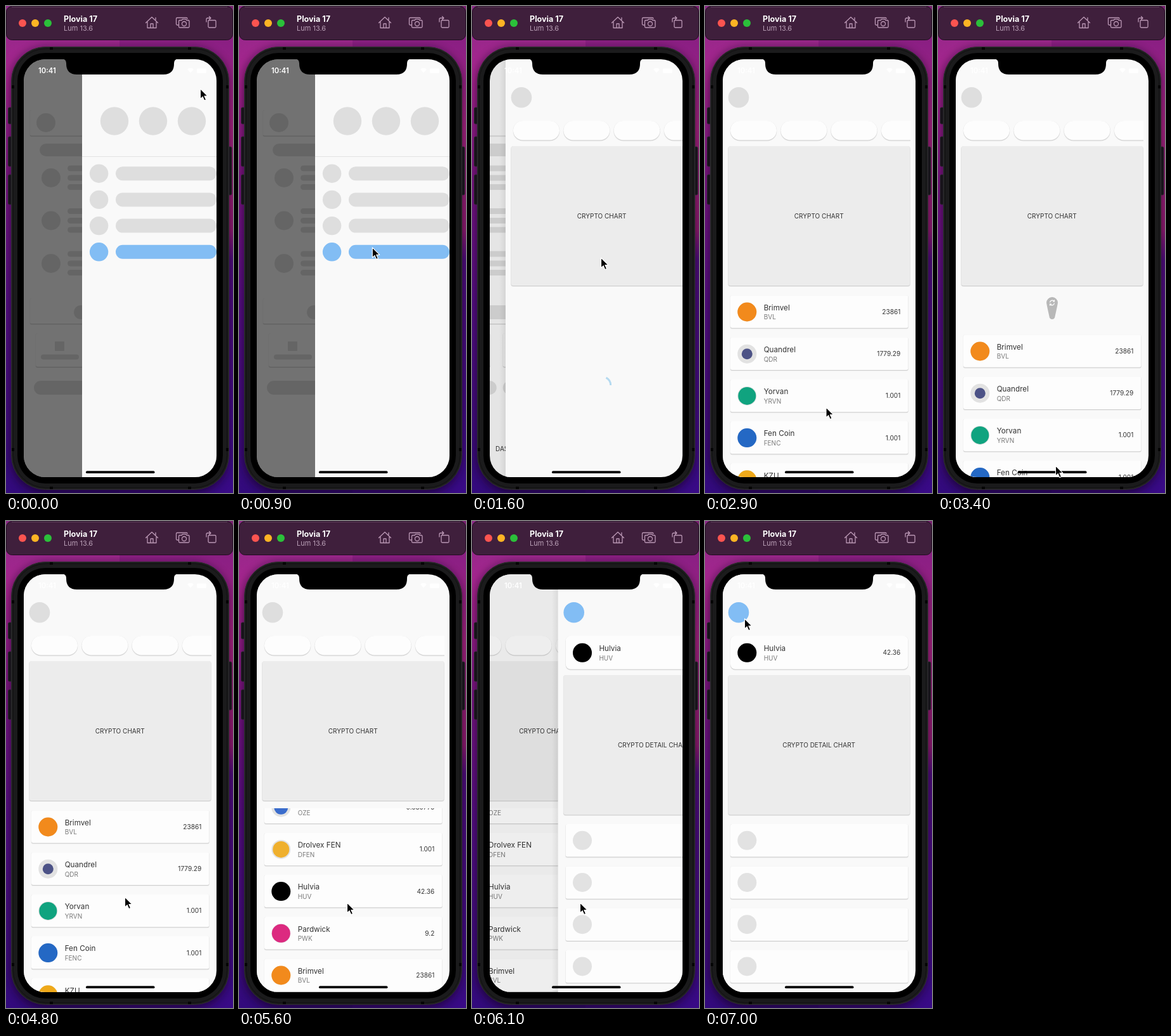
Write an HTML page that moves like this. It is 358x768 px and loops after 7100 ms.

```html
<!DOCTYPE html>
<html lang="en">
<head>
<meta charset="utf-8">
<title>Phone app walkthrough</title>
<style>
html, body { margin: 0; width: 100%; height: 100%; overflow: hidden; background: #3a0c70; }
svg { display: block; width: 358px; height: 768px; font-family: Inter, Roboto, sans-serif; }
</style>
</head>
<body>
<svg id="stage" viewBox="0 0 358 768" xmlns="http://www.w3.org/2000/svg">
  <defs>
    <linearGradient id="wallL" x2="0" y2="1">
      <stop offset="0" stop-color="#8d2a88"/><stop offset=".15" stop-color="#a9248f"/>
      <stop offset=".35" stop-color="#7c1583"/><stop offset=".6" stop-color="#560e86"/>
      <stop offset="1" stop-color="#320a7c"/>
    </linearGradient>
    <linearGradient id="wallR" x2="0" y2="1">
      <stop offset="0" stop-color="#7a2070"/><stop offset=".08" stop-color="#8c1f84"/>
      <stop offset=".25" stop-color="#a0237c"/><stop offset=".46" stop-color="#8a1a6c"/>
      <stop offset=".52" stop-color="#4a0c78"/><stop offset="1" stop-color="#380a86"/>
    </linearGradient>
    <linearGradient id="edge">
      <stop offset="0" stop-color="#000" stop-opacity="0"/>
      <stop offset="1" stop-color="#000" stop-opacity=".07"/>
    </linearGradient>
    <filter id="soft" x="-20%" y="-20%" width="140%" height="140%"><feGaussianBlur stdDeviation="7"/></filter>
    <clipPath id="screenClip"><rect x="28" y="84" width="304" height="659" rx="34"/></clipPath>
    <clipPath id="listClip"><rect x="28" y="453" width="304" height="290"/></clipPath>
    <clipPath id="chipClip"><rect x="36" y="176" width="288" height="42"/></clipPath>
  </defs>

  <rect width="358" height="768" fill="url(#wallL)"/>
  <rect x="179" width="179" height="768" fill="url(#wallR)"/>
  <rect x="6" y="66" width="346" height="704" rx="58" fill="#12001c" opacity=".6" filter="url(#soft)"/>

  <g id="bar">
    <rect x=".5" y=".5" width="357" height="53" rx="9" fill="#3f1f3c" stroke="#210d22"/>
    <path d="M9 1.5H349" stroke="#755270" opacity=".7"/>
    <circle cx="26" cy="27" r="6" fill="#fb5450"/>
    <circle cx="46" cy="27" r="6" fill="#fcb424"/>
    <circle cx="66" cy="27" r="6" fill="#2bc03a"/>
    <text x="91" y="25" font-size="12.6" font-weight="700" fill="#fff">Plovia 17</text>
    <text x="91" y="39" font-size="11" fill="#b99fb6">Lum 13.6</text>
    <g fill="none" stroke="#bb98b5" stroke-width="1.3" stroke-linejoin="round" stroke-linecap="round">
      <path d="M220.500 26.500L230 17.500L239.500 26.500M223 25V34.500H237V25M228 34V28H232V34M236 22V18.500"/>
      <path d="M271.500 30H270A1.500 1.500 0 0 1 268.500 28.500V20A1.500 1.500 0 0 1 270 18.500H284.500A1.500 1.500 0 0 1 286 20"/>
      <path d="M274 22.500H277L278.500 20.800H283.500L285 22.500H287.500A1.500 1.500 0 0 1 289 24V32.500A1.500 1.500 0 0 1 287.500 34H274A1.500 1.500 0 0 1 272.500 32.500V24A1.500 1.500 0 0 1 274 22.500Z"/>
      <circle cx="281" cy="28" r="3.500"/>
      <rect x="319" y="22.500" width="12" height="11.500" rx="1.500"/>
      <path d="M316 25V21A2 2 0 0 1 318 19H323M320.500 16.500L323 19L320.500 21.500"/>
    </g>
  </g>

  <g fill="#17131a" stroke="#2c2830" stroke-width=".8">
    <rect x="3.500" y="160" width="7" height="26" rx="2"/>
    <rect x="3.500" y="206" width="7" height="47" rx="2"/>
    <rect x="3.500" y="266" width="7" height="47" rx="2"/>
    <rect x="349" y="222" width="7" height="76" rx="2"/>
  </g>
  <rect x="8.500" y="64.500" width="343" height="698" rx="54" fill="#1b1b1c" stroke="#303032"/>
  <rect x="11.500" y="67.500" width="337" height="692" rx="51" fill="none" stroke="#111" stroke-width="1"/>
  <path d="M69 67H74M287 67H292M69 760H74M287 760H292M11 125V130M349 125V130M11 697V702M349 697V702" stroke="#050505" stroke-width="4"/>
  <rect x="18" y="74" width="324" height="679" rx="44" fill="#000"/>

  <g clip-path="url(#screenClip)">
    <g id="feed"></g>
    <rect id="scrim" x="28" y="84" width="304" height="659"/>
    <g id="drawer"></g>
    <g id="market"></g>
    <rect id="shade" x="28" y="84" width="304" height="659"/>
    <g id="detail"></g>
    <text x="51" y="106" font-size="11.300" font-weight="600" fill="#fff">10:41</text>
    <path d="M286 100Q291 95.500 296 100L291 105.500Z" fill="#fff"/>
    <rect x="301" y="98.500" width="15" height="7.500" rx="2.200" fill="#fff"/>
    <rect x="126" y="733.300" width="108.500" height="3.800" rx="1.900" fill="#000"/>
  </g>
  <path d="M88 83Q95 84 95 90V91Q95 108 112 108H248Q265 108 265 91V90Q265 84 272 83Z" fill="#000"/>
  <path id="cursor" d="M0 0V16L3.700 12.600L6.300 18.600L9 17.400L6.400 11.600H11.500Z" fill="#000" stroke="#fff" stroke-width="1.100" stroke-linejoin="round"/>
</svg>
<script>
const LOOP = 7100, STEP = 100, WIDTH = 304, PITCH = 66.2;
const PAPER = '#f9f9f9', GREY = '#dedede', BLUE = '#82bdf4';
const $ = id => document.getElementById(id);

// name, ticker, price, mark colour, mark radius
const coins = [
  ['Brimvel', 'BVL', '23861', '#f28a1c', 15],
  ['Quandrel', 'QDR', '1779.29', '#4c5286', 8.5],
  ['Yorvan', 'YRVN', '1.001', '#10a37f', 14],
  ['Fen Coin', 'FENC', '1.001', '#2468c4', 15],
  ['KZU', 'KZU', '324.5', '#efa91a', 15],
  ['VRP', 'VRP', '0.3777', '#2b2f36', 12],
  ['Orzeno', 'OZE', '0.539775', '#3a6ccc', 11],
  ['Drolvex FEN', 'DFEN', '1.001', '#efb02e', 13],
  ['Hulvia', 'HUV', '42.36', '#000', 15],
  ['Pardwick', 'PWK', '9.2', '#dc2a80', 14.5]
];

const rect = (x, y, w, h, r, fill, extra = '') =>
  `<rect x="${x}" y="${y}" width="${w}" height="${h}" rx="${r}" fill="${fill}" ${extra}/>`;
const disc = (x, y, r, fill) => `<circle cx="${x}" cy="${y}" r="${r}" fill="${fill}"/>`;
const text = (x, y, size, fill, str, anchor = 'start') =>
  `<text x="${x}" y="${y}" font-size="${size}" fill="${fill}" text-anchor="${anchor}">${str}</text>`;
const card = (x, y, w, h, r, fill = '#fdfdfd') =>
  rect(x - .5, y, w + 1, h + 1.8, r, '#000', 'opacity=".05"') +
  rect(x, y + .5, w, h + .5, r, '#000', 'opacity=".13"') + rect(x, y, w, h, r, fill);
const paper = () => rect(18, 84, 10, 659, 0, 'url(#edge)') + rect(28, 84, WIDTH, 659, 0, PAPER);

function coinRow(coin, mid, h, r) {
  const [name, code, price, color, size] = coin;
  return card(40, mid - h / 2, 280.5, h, r) + disc(66.3, mid + .5, 15, '#e2e2e2') + disc(66.3, mid + .5, size, color) +
    text(92.7, mid - 2.2, 11.7, '#333', name) + text(92.7, mid + 12.3, 10, '#7a7a7a', code) +
    text(308.3, mid + 4, 10.1, '#333', price, 'end');
}

function buildFeed() {
  let s = rect(28, 84, WIDTH, 659, 0, PAPER);
  s += card(38, 164, 284, 40.5, 2, PAPER) + disc(63, 184, 15, GREY) + rect(53, 217, 254, 20, 10, GREY);
  for (let i = 0; i < 3; i++) {
    const y = 271 + i * 67.5;
    s += disc(71, y, 15, GREY);
    for (const d of [-15, 0, 14.5]) s += rect(97, y + d - 4.5, 205, 9, 4.5, GREY);
  }
  s += card(38, 461, 284, 40, 2, PAPER) + rect(107, 472, 146, 22, 11, GREY);
  for (let i = 0; i < 3; i++) {
    const x = 47 + i * 95;
    s += card(x, 516, 75, 53, 3, PAPER) + rect(x + 30, 529, 15, 15, 1, GREY) + rect(x + 8, 549.5, 60, 8, 4, GREY);
  }
  s += rect(44, 591, 88, 22, 11, GREY) + rect(142, 591, 88, 22, 11, GREY);
  return s + text(180, 702, 10, '#333', 'DASHBOARD CHART', 'middle');
}

function buildDrawer() {
  let s = rect(120, 84, 212, 659, 0, PAPER) + rect(120, 237, 212, 1, 0, '#e2e2e2');
  for (const x of [171, 232, 293]) s += disc(x, 181.5, 22.2, GREY);
  for (let i = 0; i < 4; i++) {
    const y = 264.2 + i * 41.2, c = i === 3 ? BLUE : GREY;
    s += disc(146.6, y, 14.7, c) + rect(173, y - 11, 159, 22, 11, c);
  }
  return s;
}

function buildMarket() {
  let s = paper() + disc(53, 144.3, 16.3, GREY), chips = '', rows = '';
  for (let i = 0; i < 4; i++) chips += card(40 + i * 79.3, 181, 73, 30.5, 15.2);
  for (let i = 0; i < 12; i++) rows += coinRow(coins[i % coins.length], 482 + i * PITCH, 51.5, 3);
  let spokes = '';
  for (let i = 0; i < 8; i++)
    spokes += `<path d="M0 -3.500V-7" transform="rotate(${i * 45})" opacity="${.25 + i * .09}"/>`;
  s += `<g clip-path="url(#chipClip)">${chips}</g>` + card(36.5, 221, 287, 220, 4, '#ececec') +
    text(179.7, 334.6, 10, '#333', 'CRYPTO CHART', 'middle') +
    `<path id="loader" fill="none" stroke="#b5daf0" stroke-width="3"/>
     <g clip-path="url(#listClip)"><g id="rows">${rows}</g></g>
     <g id="drop"><path id="blob" fill="#b8b8b8"/>
       <path d="M176.500 467.500A3.700 3.700 0 0 1 183 465.500M183.500 468.500A3.700 3.700 0 0 1 177 470.500M183.500 463.500V466H181M176.500 472.500V470H179" fill="none" stroke="#fff" stroke-width="1.200"/></g>
     <g id="wait"><g id="spokes" stroke="#777" stroke-width="1.600" stroke-linecap="round">${spokes}</g></g>`;
  return s;
}

function buildDetail() {
  let s = paper() + disc(53, 144.3, 16.3, BLUE) + coinRow(coins[8], 207.3, 53, 8) +
    card(36.5, 243, 287, 220.3, 4, '#ececec') + text(179.7, 356.6, 10, '#333', 'CRYPTO DETAIL CHART', 'middle');
  for (let i = 0; i < 4; i++) {
    const y = 503.8 + i * PITCH;
    s += card(40, y - 25.7, 280.5, 51.5, 3) + disc(66.3, y, 15, '#e2e2e2');
  }
  return s;
}

$('feed').innerHTML = buildFeed();
$('drawer').innerHTML = buildDrawer();
$('market').innerHTML = buildMarket();
$('detail').innerHTML = buildDetail();

const span = (t, a, b) => Math.min(1, Math.max(0, (t - a) / (b - a)));
const smooth = p => p * p * (3 - 2 * p);
const out = p => 1 - (1 - p) ** 3;
const move = (id, x, y = 0) => $(id).setAttribute('transform', `translate(${x} ${y})`);
const show = (id, on) => $(id).setAttribute('visibility', on ? 'inherit' : 'hidden');

// time, x, y of the pointer tip
const path = [
  [0, 306.5, 130.5], [200, 306.5, 130.5], [1000, 206, 392], [1600, 203.5, 397], [2100, 203.5, 398],
  [2800, 191, 633], [2900, 191, 633], [3400, 185.5, 725], [3600, 185.5, 727], [4100, 187, 700],
  [4700, 187.5, 593], [4800, 187.5, 593], [4950, 186, 640], [5150, 180, 550], [5500, 170.5, 602],
  [6350, 170.5, 602], [6900, 62.5, 154], [7100, 62.5, 154]
];
function pointer(t) {
  const i = Math.max(1, path.findIndex(k => k[0] > t));
  const [a, b] = [path[i - 1], path[i]], p = smooth(span(t, a[0], b[0]));
  move('cursor', a[1] + (b[1] - a[1]) * p, a[2] + (b[2] - a[2]) * p);
}

function arc(t) {
  const dt = t - 1600, a0 = (-62 + dt * .36) * Math.PI / 180;
  const sweep = (62 + 180 * Math.sin(Math.PI * dt / 1333) ** 2) * Math.PI / 180;
  const at = a => `${180.2 + 13.5 * Math.cos(a)} ${598 + 13.5 * Math.sin(a)}`;
  return `M${at(a0)}A13.5 13.5 0 ${sweep > Math.PI ? 1 : 0} 1 ${at(a0 + sweep)}`;
}

function blob(pull) {
  const end = 468 + 21.5 * span(pull, 25, 62);
  return `M171 468A9 9 0 0 1 189 468Q188 474 184.5 ${end}A4.5 4.5 0 0 1 175.5 ${end}Q172 474 171 468Z`;
}

function draw(t) {
  const close = out(span(t, 1200, 1450));
  const push = out(span(t, 1315, 1815));
  const open = out(span(t, 5950, 6450));
  move('drawer', 214 * close);
  move('feed', -WIDTH / 3 * push);
  $('scrim').setAttribute('opacity', .54 * (1 - close) + .09 * push * close);
  move('market', (WIDTH + 10) * (1 - push) - WIDTH / 3 * open);
  $('shade').setAttribute('opacity', .09 * open);
  move('detail', (WIDTH + 10) * (1 - open));
  show('market', push > 0);
  show('detail', open > 0);

  const loaded = t >= 2300;
  show('loader', !loaded);
  show('rows', loaded);
  $('loader').setAttribute('d', arc(t));

  const pull = 62 * smooth(span(t, 2900, 3400)) * (1 - smooth(span(t, 4200, 4500)));
  const scroll = 428 * out(span(t, 4900, 5600));
  move('rows', 0, pull - scroll);
  show('drop', pull > 20 && t < 3600);
  show('wait', t >= 3600 && t < 4300);
  $('blob').setAttribute('d', blob(pull));
  move('wait', 180, 478);
  $('spokes').setAttribute('transform', `rotate(${Math.floor(t / 100) * 45})`);
  pointer(t);
}

const start = performance.now();
function tick() {
  const t = (performance.now() - start) % LOOP;
  draw(Math.floor(t / STEP) * STEP);
  requestAnimationFrame(tick);
}
draw(0);
requestAnimationFrame(tick);
</script>
</body>
</html>
```
